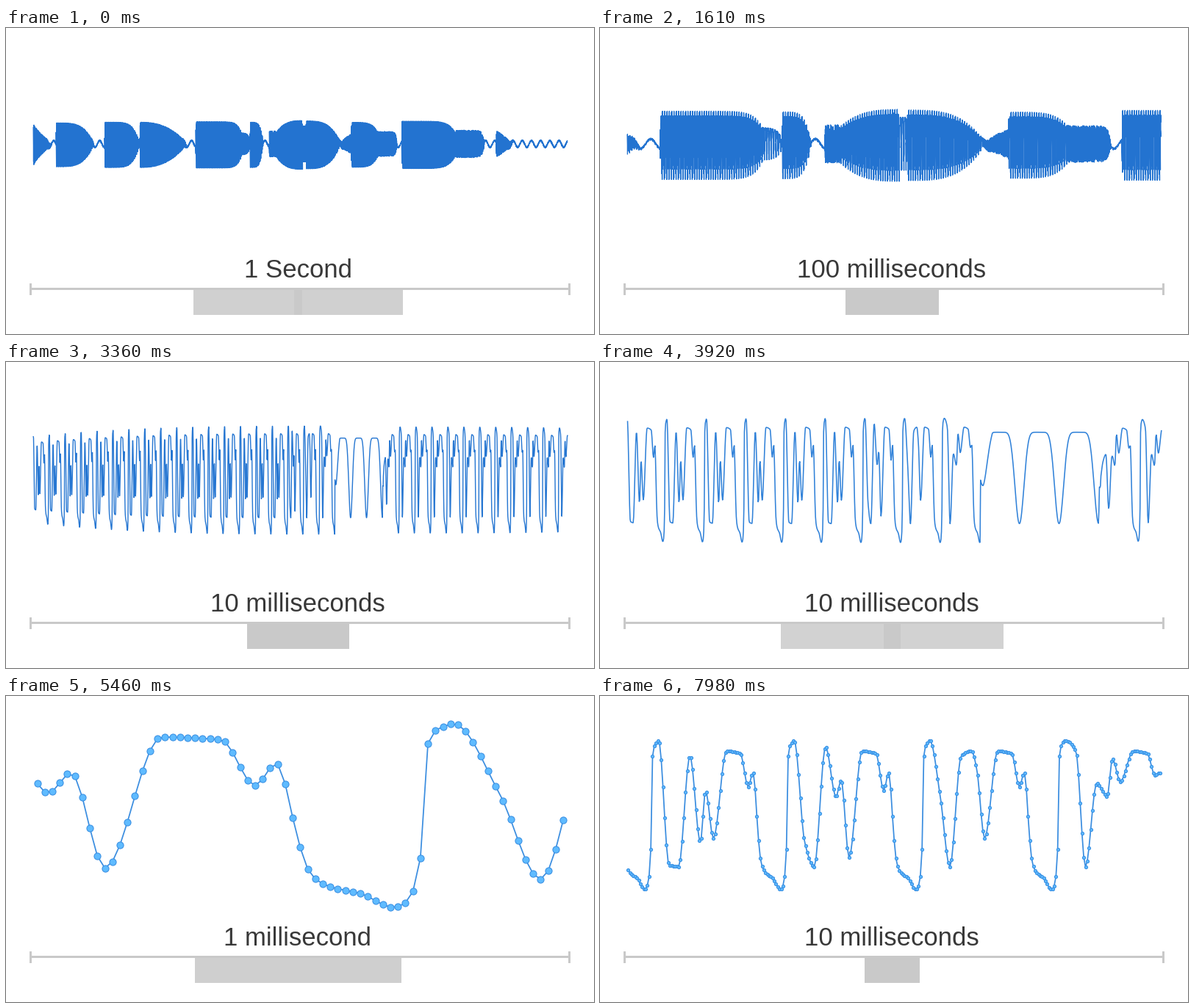
Animation of 800x417 px, one loop 8 s. Source, as a matplotlib script:

```python
import numpy as np
import matplotlib.pyplot as plt
from matplotlib.animation import FuncAnimation
from matplotlib.patches import Rectangle

W, H, DPI = 800, 417, 64
PT = 72 / DPI                      # points per pixel
STEP, TICK, LOOP = 70, 20, 8000    # ms
PEAK = 6.312                       # moment of deepest zoom, s
CX, CY = 400.3, 158                # fixed point of the zoom
LEFT, RIGHT = 37, 764
WIDE = 0.0181                      # px per sample, fully zoomed out
PERIOD = 78                        # samples per pitch cycle
BAR = 733                          # length of the time bar


def pchip(x, y, xi):
    """Monotone cubic interpolation with flat ends."""
    x, y = np.asarray(x, float), np.asarray(y, float)
    h = np.diff(x)
    d = np.diff(y) / h
    m = np.zeros_like(y)
    same = d[:-1] * d[1:] > 0
    m[1:-1][same] = 2 * d[:-1][same] * d[1:][same] / (d[:-1] + d[1:])[same]
    i = np.clip(np.searchsorted(x, xi) - 1, 0, len(x) - 2)
    u = (xi - x[i]) / h[i]
    return (y[i] * (1 + 2 * u) * (1 - u) ** 2 + y[i + 1] * u * u * (3 - 2 * u)
            + h[i] * u * (1 - u) * (m[i] * (1 - u) - m[i + 1] * u))


# Turning points of the trough that every pitch cycle shares (offset, %)
TROUGH = [(-12.5, -38), (-11, -68), (-8.5, -80), (-4.5, -87), (0, -102),
          (1.5, -97), (2.5, -85), (3.5, -49), (4.5, 73), (5.5, 87), (8, 94)]


def ringing(d):
    """Turning points after the trough; d morphs the vowel."""
    return [(14, np.clip(60 * d - 40, -70, 80)), (19.5, -72),
            (26, 86 - 12 * d * d), (32, 20 + 60 * np.sin(np.pi * d / 2)),
            (35, 42 + 14 * d), (39.5, 25 * d * d - 60), (47, 80), (55, 77),
            (59.5, 28 + 5 * d * d), (62.3, 52)]


# Syllables on the widest view: start, end, level, fade power (negative swells)
VOICE = [(36, 64, .95, .7), (68, 120, .9, 4), (134, 182, .93, 6),
         (182, 247, .93, 2.5), (258, 324, .95, 12), (332, 350, .93, 5),
         (358, 403.36, 1, -3), (407.6, 456, .98, 3.5), (469.5, 512, .92, 5),
         (538.5, 618, .97, 8)]
HUM = [(300, 333, .44, 12), (403.3, 407.6, .72, 999)]
HISS = [(358, 372, .52, 12), (450, 472, .42, -1.2), (500, 532, .5, 20),
        (612, 651, .55, 15), (667, 692, .55, 1)]


def loudness(x, lobes):
    total = np.zeros_like(x)
    for a, b, level, power in lobes:
        u = np.clip((x - a) / (b - a), 0, 1)
        shape = 1 - u ** power if power > 0 else 1 - (1 - u) ** -power
        attack = np.clip((x - a) / .5, 0, 1)
        total = np.maximum(total, level * shape * attack * (x < b))
    return total


def make_sound():
    n = np.arange(-20200, 20201)
    x = CX + WIDE * n
    knots = [(PERIOD * k - 65.5 + p, v / 100) for k in range(-262, 264)
             for p, v in TROUGH + ringing(np.clip(k, -1, 2))]
    voice = pchip(*zip(*knots), n)
    hum = 1 - 2 * np.abs(np.cos(np.pi * (n - 168.5) / PERIOD)) ** 8
    hiss = np.random.default_rng(4).uniform(-1, 1, n.size)

    louds = np.array([loudness(x, s) for s in (VOICE, HUM, HISS)])
    loud = np.maximum(louds.max(0), .03)
    tone = np.choose(louds.argmax(0), [voice, hum, hiss])
    sway = .15 * np.cos(2 * np.pi * (x - 352.4) / 12.5)
    return n, loud * tone + sway * np.clip(1 - loud / .25, 0, 1)


N, SOUND = make_sound()

# Key points of the log zoom over time (s)
ZOOM_T = [0, .77, 2.38, 3.36, 4.48, 4.644, 5.904, PEAK]
ZOOM = [-4.012, -3.725, -2.56, -1.28, .593, .861, 2.885, 3.1]

# Time spans: label, when its box is SMALL px wide, when it fills the bar
SMALL = 36
SPANS = [("1 Second", -2.79, 1.27), ("100 milliseconds", .77, 2.77),
         ("10 milliseconds", 2.38, 4.56), ("1 millisecond", 4.2, 6.05)]
DARK, LIGHT = np.array([35, 115, 208]) / 255, np.array([60, 142, 224]) / 255

fig = plt.figure(figsize=(W / DPI, H / DPI), dpi=DPI, facecolor="white")
ax = fig.add_axes([0, 0, 1, 1])
ax.set(xlim=(0, W), ylim=(H, 0))
ax.axis("off")


def box(x, y, w, h, z, color="#c9c9c9"):
    return ax.add_patch(Rectangle((x, y), w, h, fc=color, lw=0, zorder=z))


boxes = [box(397, 357, 0, 34, i) for i in range(len(SPANS))]
box(33, 354, BAR, 3, 5)
box(32, 348, 3, 16, 5)
box(765, 348, 3, 16, 5)
label = ax.text(397, 339.5, "", ha="center", va="baseline", zorder=6,
                family="Liberation Sans", size=34.7 * PT, color="#383838")
line, = ax.plot([], [], zorder=7, solid_joinstyle="round")
dots, = ax.plot([], [], "o", zorder=8, mfc="#5fbbff", mec="#3c92e4",
                mew=1.1 * PT)


def trace(scale):
    """Visible samples; dense views keep the extremes of each small group."""
    lo = int(np.ceil((LEFT - CX) / scale)) - N[0]
    hi = int(np.floor((RIGHT - CX) / scale)) - N[0] + 1
    lo, hi = max(lo, 0), min(hi, N.size)
    g = int(.5 / scale)
    if g < 2:
        return CX + scale * N[lo:hi], SOUND[lo:hi]
    lo = -(-lo // g) * g
    count = (hi - lo) // g
    part = SOUND[lo:lo + count * g].reshape(count, g)
    y = np.column_stack([part.min(1), part.max(1)]).ravel()
    mid = N[lo] + g * (np.arange(count) + .5)
    return np.repeat(CX + scale * mid, 2), y


def update(i):
    t = (i * TICK + TICK // 2) // STEP * STEP / 1000
    u = min(t, 2 * PEAK - t)       # zoom in, then back out
    z = float(pchip(ZOOM_T, ZOOM, u))
    x, y = trace(np.exp(z))
    y = CY - y * (34 + 9.4 * u + .26 * u ** 3)
    line.set_data(x, y)
    mix = np.clip((z + 1.6) / 2.2, 0, 1)
    line.set_color(DARK + (LIGHT - DARK) * mix)
    line.set_linewidth((1.35 + .4 * mix) * PT)

    radius = 1.1 + 1.7 * z
    dots.set_visible(radius > .9)
    if radius > .9:
        dots.set_data(x, y)
        dots.set_markersize((2 * radius - 1) * PT)

    name = SPANS[0][0]
    for rect, (text, born, full) in zip(boxes, SPANS):
        grown = min((u - born) / (full - born), 1)
        w = SMALL * (BAR / SMALL) ** grown
        rect.set_x(397.5 - w / 2)
        rect.set_width(w)
        rect.set_facecolor([np.interp(w, [220, BAR], [201, 255]) / 255] * 3)
        if w > 90:
            name = text
    label.set_text(name)
    return [line, dots, label, *boxes]


anim = FuncAnimation(fig, update, frames=LOOP // TICK, interval=TICK,
                     init_func=lambda: update(0), repeat=True,
                     repeat_delay=0, blit=False)
plt.show()
```
